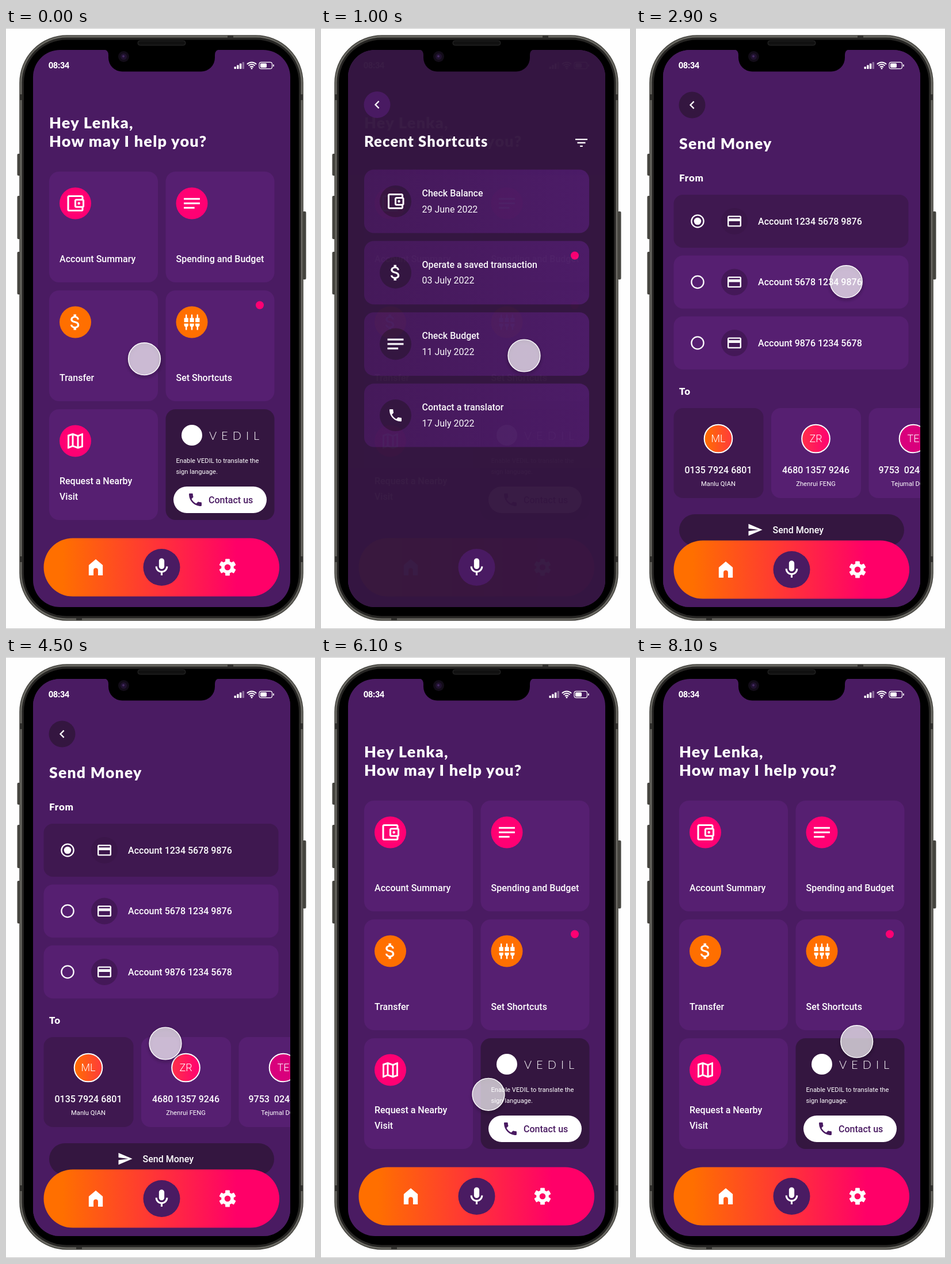
Write an HTML page that moves like this. It is 537 px wide and 1042 px high and loops after 8.2 s.

```html
<!DOCTYPE html>
<html lang="en">
<head>
<meta charset="utf-8">
<title>Banking app walkthrough</title>
<style>
  html, body { margin: 0; width: 100%; height: 100%; overflow: hidden; background: #fefefe; }
  svg { display: block; width: 537px; height: 1042px; }
  text { font: 500 16px Roboto, sans-serif; fill: #fff; white-space: pre; }
  .head { font-family: Lato, sans-serif; font-weight: 900; letter-spacing: .047em; }
</style>
</head>
<body>
<svg id="stage" viewBox="0 0 537 1042" xmlns="http://www.w3.org/2000/svg"></svg>
<script>
const LOOP = 8200;
const BG = '#4a1b62', CARD = '#561f71', DARK = '#341640', PICKED = '#3f1850';
const PINK = '#ff0073', ORANGE = '#ff6f00';

// 24-unit icon outlines
const ICONS = {
  wallet: 'M21 7.28V5c0-1.1-.9-2-2-2H5c-1.11 0-2 .9-2 2v14c0 1.1.89 2 2 2h14c1.1 0 2-.9 2-2v-2.28c.59-.35 1-.98 1-1.72V9c0-.74-.41-1.37-1-1.72zM20 9v6h-7V9h7zM5 19V5h14v2h-6c-1.1 0-2 .9-2 2v6c0 1.1.9 2 2 2h6v2H5zM14.5 12a1.5 1.5 0 1 0 3 0a1.5 1.5 0 1 0-3 0z',
  notes: 'M3 18h12v-2H3v2zM3 6v2h18V6H3zm0 7h18v-2H3v2z',
  dollar: 'M11.8 10.9c-2.27-.59-3-1.2-3-2.15 0-1.09 1.01-1.85 2.7-1.85 1.78 0 2.44.85 2.5 2.1h2.21c-.07-1.72-1.12-3.3-3.21-3.81V3h-3v2.16c-1.94.42-3.5 1.68-3.5 3.61 0 2.31 1.91 3.46 4.7 4.13 2.5.6 3 1.48 3 2.41 0 .69-.49 1.79-2.7 1.79-2.06 0-2.87-.92-2.98-2.1h-2.2c.12 2.19 1.76 3.42 3.68 3.83V21h3v-2.15c1.95-.37 3.5-1.5 3.5-3.55 0-2.84-2.43-3.81-4.7-4.4z',
  plugs: [4, 12, 20].map(x => `M${x - 1} 6V2a1 1 0 0 1 2 0V6h2v6h-6V6zM${x - 3} 14h6v2a3 3 0 0 1-2 2.8V23h-2v-4.2a3 3 0 0 1-2-2.8z`).join(''),
  map: 'M20.5 3l-.16.03L15 5.1 9 3 3.36 4.9c-.21.07-.36.25-.36.48V20.5c0 .28.22.5.5.5l.16-.03L9 18.9l6 2.1 5.64-1.9c.21-.07.36-.25.36-.48V3.5c0-.28-.22-.5-.5-.5zM10 5.47l4 1.4v11.66l-4-1.4V5.47zm-5 .99l3-1.01v11.7l-3 1.16V6.46zm14 11.08l-3 1.01V6.86l3-1.16v11.84z',
  phone: 'M6.62 10.79c1.44 2.83 3.76 5.14 6.59 6.59l2.2-2.2c.27-.27.67-.36 1.02-.24 1.12.37 2.33.57 3.57.57.55 0 1 .45 1 1V20c0 .55-.45 1-1 1-9.39 0-17-7.61-17-17 0-.55.45-1 1-1h3.5c.55 0 1 .45 1 1 0 1.25.2 2.45.57 3.57.11.35.03.74-.25 1.02l-2.2 2.2z',
  home: 'M12 2.8L20 9.6V21.2H14.6V15.4a2.6 2.6 0 0 0-5.2 0V21.2H4V9.6z',
  mic: 'M12 14c1.66 0 3-1.34 3-3V5c0-1.66-1.34-3-3-3S9 3.34 9 5v6c0 1.66 1.34 3 3 3zM17 11c0 2.76-2.24 5-5 5s-5-2.24-5-5H5c0 3.53 2.61 6.43 6 6.92V21h2v-3.08c3.39-.49 6-3.39 6-6.92h-2z',
  send: 'M2 21L23 12 2 3V10l15 2-15 2z',
  card: 'M20 4H4c-1.11 0-2 .89-2 2V18c0 1.11.89 2 2 2h16c1.11 0 2-.89 2-2V6c0-1.11-.89-2-2-2zm0 14H4v-6h16v6zm0-10H4V6h16v2z',
  back: 'M15.41 7.41 14 6l-6 6 6 6 1.41-1.41L10.83 12z',
  filter: 'M10 18h4v-2h-4v2zM3 6v2h18V6H3zm3 7h12v-2H6v2z'
};

const rect = (x, y, w, h, r, fill, more = '') =>
  `<rect x="${x}" y="${y}" width="${w}" height="${h}" rx="${r}" fill="${fill}" ${more}/>`;
const disc = (x, y, r, fill, more = '') => `<circle cx="${x}" cy="${y}" r="${r}" fill="${fill}" ${more}/>`;
const icon = (name, x, y, k, fill = '#fff') =>
  `<path transform="translate(${x - 12 * k} ${y - 12 * k}) scale(${k})" d="${ICONS[name]}" fill="${fill}"/>`;
const text = (x, y, s, style = '', more = '') => `<text x="${x}" y="${y}" style="${style}" ${more}>${s}</text>`;
const mid = (x, y, s, style = '') => text(x, y, s, 'text-anchor:middle;' + style);
const head = (x, y, s, size) => text(x, y, s, `font-size:${size}px`, 'class="head"');
const ramp = (id, from, to, a = 0, b = 1) =>
  `<linearGradient id="${id}"><stop offset="${a}" stop-color="${from}"/><stop offset="${b}" stop-color="${to}"/></linearGradient>`;
const page = (id, fill, body) => `<g id="${id}">${rect(46, 36, 450, 970, 0, fill)}${body}</g>`;

function gear(x, y) {
  const teeth = [0, 60, 120].map(a => rect(-3.9, -14.6, 7.8, 29.2, 1.2, '#fff', `transform="rotate(${a})"`)).join('');
  return `<g transform="translate(${x} ${y})" mask="url(#hub)">${teeth}${disc(0, 0, 10.8, '#fff')}</g>`;
}

function statusBar() {
  const bars = [0, 1, 2, 3].map(i =>
    rect(396.5 + i * 4.7, 67 - i * 2.7, 3.4, 4 + i * 2.7, .8, '#fff', i === 3 ? 'opacity=".35"' : '')).join('');
  const wifi = [4.2, 8, 11.6].map(r => {
    const d = r * .7;
    return `<path d="M${427 - d} ${71 - d}A${r} ${r} 0 0 1 ${427 + d} ${71 - d}" fill="none" stroke="#fff" stroke-width="2"/>`;
  }).join('');
  return text(74, 70, '08:34', 'font:900 14px Lato,sans-serif') + bars + wifi + disc(427, 70, 1.5, '#fff') +
    rect(440, 59.3, 22.5, 11.4, 3.4, 'none', 'stroke="#fff" stroke-width="1.2"') +
    rect(442, 61.3, 11, 7.4, 1.6, '#fff') + rect(464, 63, 1.8, 4, .9, '#fff');
}

const micButton = y => disc(270.5, y, 32, BG) + icon('mic', 270.5, y, 1.55);
const navBar = y => rect(65.5, y - 50.5, 409.5, 101, 50.5, 'url(#nav)') +
  icon('home', 156, y, 1.52) + micButton(y) + gear(385, y);

function homePage() {
  const tile = (x, y, name, k, color, label) => rect(x, y, 189, 192, 17, CARD) +
    disc(x + 45.5, y + 55, 27.5, color) + icon(name, x + 45.5, y + 55, k) + text(x + 18, y + 157, label);
  return page('home', BG, statusBar() +
    head(75, 173.5, 'Hey Lenka,', 27) + head(75, 206, 'How may I help you?', 27) +
    tile(75, 249, 'wallet', 1.56, PINK, 'Account Summary') +
    tile(277.5, 249, 'notes', 1.55, PINK, 'Spending and Budget') +
    tile(75, 455, 'dollar', 1.5, ORANGE, 'Transfer') +
    tile(277.5, 455, 'plugs', 1.22, ORANGE, 'Set Shortcuts') +
    tile(75, 661, 'map', 1.5, PINK, '') +
    text(93, 791, 'Request a Nearby') + text(93, 818, 'Visit') +
    disc(441, 480.5, 7, PINK) +
    rect(277.5, 661, 189, 192, 17, DARK) + disc(323, 706, 18, '#fff') +
    text(353, 714, 'VEDIL', 'font:300 20px Lato,sans-serif;letter-spacing:8px') +
    text(295.5, 754, 'Enable VEDIL to translate the', 'font-size:11.2px;font-weight:400') +
    text(295.5, 772.5, 'sign language.', 'font-size:11.2px;font-weight:400') +
    rect(291, 795, 162, 46, 23, '#fff') + icon('phone', 329, 818, 1.22, BG) +
    text(352, 823.5, 'Contact us', 'fill:' + BG) + navBar(935));
}

function shortcutsPage() {
  const rows = [
    ['wallet', 1.5, 'Check Balance', '29 June 2022'],
    ['dollar', 1.5, 'Operate a saved transaction', '03 July 2022'],
    ['notes', 1.55, 'Check Budget', '11 July 2022'],
    ['phone', 1.17, 'Contact a translator', '17 July 2022']
  ].map(([name, k, title, date], i) => {
    const y = 245.5 + i * 123.7;
    return rect(75, y, 391, 110, 17, 'url(#row)') + disc(129.5, y + 55, 27.5, DARK) +
      icon(name, 129.5, y + 55, k) + text(175.5, y + 46.5, title) + text(175.5, y + 74, date, 'font-weight:400');
  }).join('');
  return page('shortcuts', DARK, disc(97.5, 133, 23, BG) + icon('back', 97.5, 133, 1.15) +
    head(75, 206, 'Recent Shortcuts', 25.5) + icon('filter', 452.5, 199, 1.17) +
    rows + disc(441, 394.5, 7, PINK) + micButton(935));
}

function sendPage() {
  const account = (y, num, on) => rect(65.5, y - 46, 408, 92, 16, on ? PICKED : CARD) +
    disc(107, y, 10.6, 'none', 'stroke="#fff" stroke-width="2.3"') + (on ? disc(107, y, 6.3, '#fff') : '') +
    disc(171, y, 23, on ? '#3b164a' : '#441858') + icon('card', 171, y, 1.2) + text(212, y + 5.5, 'Account ' + num);
  const payee = (x, mark, fill, num, name, on) => rect(x, 659, 156, 156, 16, on ? PICKED : CARD) +
    disc(x + 77.5, 712, 24.3, fill, 'stroke="#fff" stroke-width="2"') +
    mid(x + 77.5, 718, mark, 'font-size:18px;font-weight:300') +
    mid(x + 77.5, 771.5, num) + mid(x + 77.5, 794, name, 'font-size:11.2px;font-weight:400');
  const body = disc(97.5, 133.5, 23, DARK) + icon('back', 97.5, 133.5, 1.15) +
    head(75, 210, 'Send Money', 26.5) + head(75, 266, 'From', 17) +
    account(335, '1234 5678 9876', true) + account(440.5, '5678 1234 9876') + account(546, '9876 1234 5678') +
    head(75, 636, 'To', 17) +
    payee(65.5, 'ML', 'url(#warm)', '0135 7924 6801', 'Manlu QIAN', true) +
    payee(235, 'ZR', 'url(#hot)', '4680 1357 9246', 'Zhenrui FENG') +
    payee(404.5, 'TE', '#d9007c', '9753  0246 8135', 'Tejumal DORVE') +
    rect(75, 843, 391, 55, 27.5, DARK) + icon('send', 207, 870, 1.15) + text(237.5, 875.5, 'Send Money') +
    rect(75, 915.5, 391, 55, 27.5, '#fff') + mid(270.5, 948.5, 'Save as a Showcut', 'fill:' + DARK);
  return page('send', BG, `<g id="scroll">${body}</g>` + statusBar() + navBar(939));
}

function phoneBody() {
  const keys = [[19.5, 218, 38], [19.5, 291, 75], [19.5, 388, 74], [515.5, 318, 118]]
    .map(([x, y, h]) => rect(x, y, 6, h, 2, '#45443f')).join('');
  const bands = [[24, 115, 4, 10], [512, 115, 4, 10], [24, 916, 4, 10], [512, 916, 4, 10], [385, 13, 10, 4], [122, 1023, 10, 4]]
    .map(([x, y, w, h]) => rect(x, y, w, h, 0, '#33322f')).join('');
  return rect(0, 0, 537, 1, 0, '#c9c9c9') + rect(0, 1041, 537, 1, 0, '#c9c9c9') + keys +
    rect(24, 13, 492, 1014, 82, '#6a6963', 'stroke="#45443f" stroke-width="1.5"') + bands +
    rect(27.5, 16.5, 485, 1007, 78, '#262523') +
    rect(31, 20.5, 478, 999, 74, '#000');
}

const notch = '<path d="M168 37q10 0 10 10v4.5a24 24 0 0 0 24 24h137a24 24 0 0 0 24-24v-4.5q0-10 10-10z"/>' +
  rect(229, 22, 83, 8, 4, '#111', 'stroke="#292929"') +
  disc(204.5, 49.5, 9.5, '#120c18') + disc(204.5, 49.5, 5.5, '#20122f') + disc(204, 49, 2, '#432a60');

document.getElementById('stage').innerHTML = `<defs>
  ${ramp('nav', ORANGE, '#ff0068', .08, .82)}${ramp('row', '#45195a', '#4c1c67')}
  ${ramp('warm', ORANGE, '#ff3a3c')}${ramp('hot', '#ff3048', PINK)}
  <clipPath id="screen"><rect x="47" y="38" width="447" height="966" rx="47"/></clipPath>
  <mask id="hub" maskUnits="userSpaceOnUse" x="-20" y="-20" width="40" height="40">
    ${rect(-20, -20, 40, 40, 0, '#fff')}${disc(0, 0, 5.3, '#000')}</mask>
  <filter id="blur" x="-50%" y="-50%" width="200%" height="200%"><feGaussianBlur stdDeviation="2.5"/></filter>
  </defs>${phoneBody()}
  <g clip-path="url(#screen)">${homePage()}${shortcutsPage()}${sendPage()}</g>${notch}
  <g id="cursor">${disc(0, 3, 28, 'none', 'stroke="#000" stroke-width="3" opacity=".3" filter="url(#blur)"')}
  ${disc(0, 0, 27.9, '#fff', 'fill-opacity=".69" stroke="#fff" stroke-width="1.4"')}</g>`;

const [shortcuts, send, scroll, cursor] = ['shortcuts', 'send', 'scroll', 'cursor'].map(id => document.getElementById(id));

// time, x, y
const PATH = [
  [0, 240.5, 573.7], [550, 372, 562], [750, 368, 563], [1000, 353, 568], [1500, 352, 545],
  [2300, 363, 442], [2900, 365.3, 439.7], [3500, 360, 455], [4300, 278, 664], [4500, 277, 670],
  [5300, 288.7, 690], [5650, 296, 832], [5800, 296, 832], [6100, 291, 758.3],
  [6900, 372, 674], [8100, 383.7, 666.7]
];

const span = (t, a, b) => Math.min(1, Math.max(0, (t - a) / (b - a)));
const smooth = p => p * p * (3 - 2 * p);
const easeOut = p => 1 - (1 - p) ** 2;

function cursorAt(t) {
  const i = PATH.findIndex(k => k[0] > t);
  if (i < 0) return PATH[PATH.length - 1].slice(1);
  const [a, b] = [PATH[i - 1], PATH[i]];
  const p = smooth(span(t, a[0], b[0]));
  return [1, 2].map(j => a[j] + (b[j] - a[j]) * p);
}

function fade(el, alpha) {
  el.setAttribute('opacity', alpha);
  el.setAttribute('display', alpha > 0 ? 'inline' : 'none');
}

function draw(t) {
  fade(shortcuts, t < 5000 ? easeOut(span(t, 700, 1060)) : 0);
  fade(send, easeOut(span(t, 2730, 2890)) * (1 - easeOut(span(t, 5740, 6040))));
  scroll.setAttribute('transform', `translate(0 ${-106.5 * smooth(span(t, 4600, 5200))})`);
  cursor.setAttribute('transform', `translate(${cursorAt(t)})`);
}

const start = performance.now();
function tick() {
  draw((performance.now() - start) % LOOP);
  requestAnimationFrame(tick);
}
draw(0);
requestAnimationFrame(tick);
</script>
</body>
</html>
```
